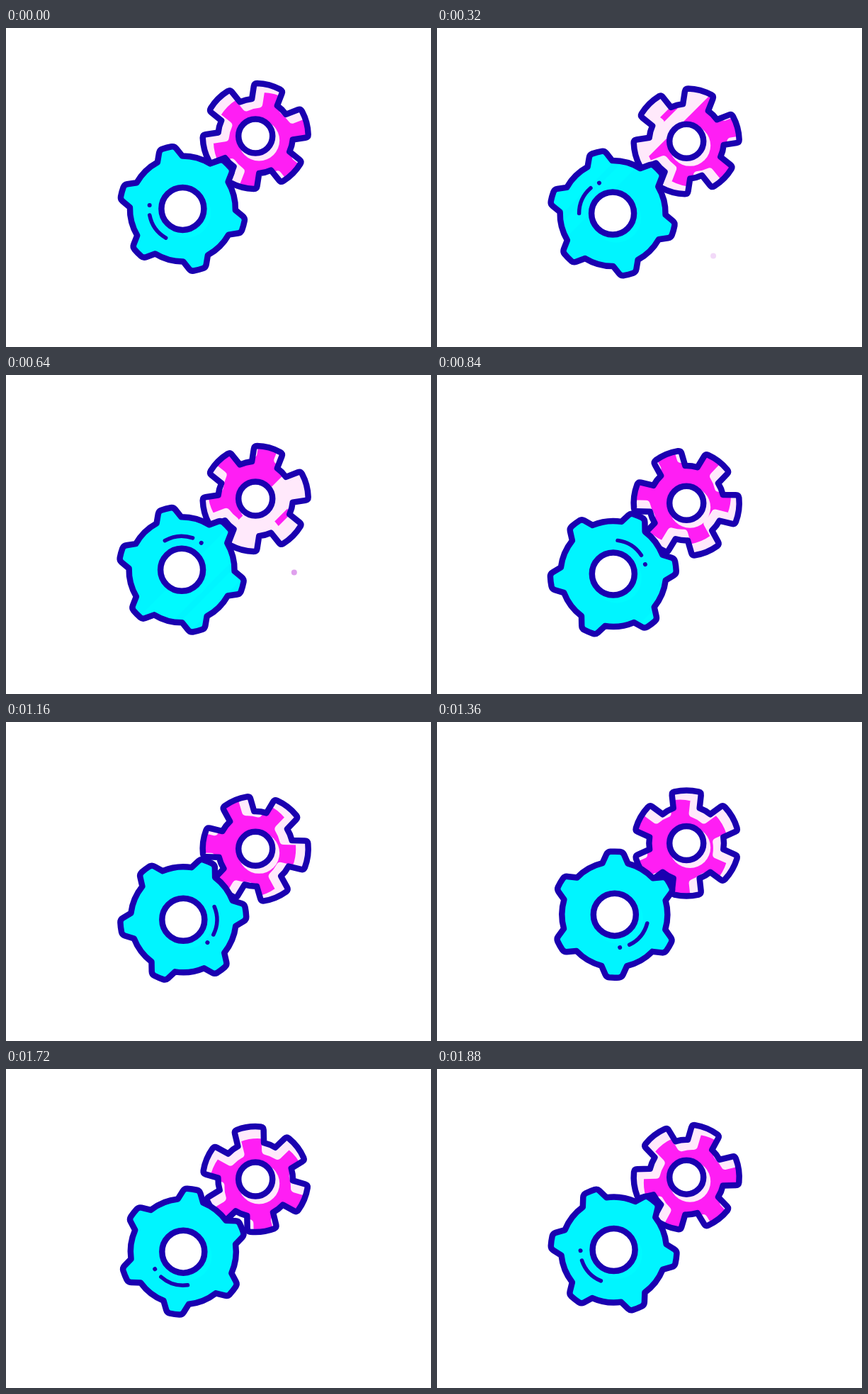
Write an HTML page with a canvas that moves like this. It is 600 px wide and 450 px high and loops after 1.92 s.

```html
<!DOCTYPE html>
<html lang="en">
<head>
<meta charset="utf-8">
<title>Gears</title>
<style>
  html, body { margin: 0; width: 100%; height: 100%; overflow: hidden; background: #fff; }
  canvas { display: block; }
</style>
</head>
<body>
<canvas id="stage" width="600" height="450"></canvas>
<script>
const ctx = document.getElementById('stage').getContext('2d');
const LOOP = 1920, STEP = 40, TEETH = 6, TAU = Math.PI * 2, RAD = Math.PI / 180;
const INK = '#1a00b0', LINE = 8.5, ROUND = 4;

const polar = (r, a) => [r * Math.cos(a), r * Math.sin(a)];

// Teeth between radius low and high; root and tip are half widths in degrees
function gearPath({ low, high, root, tip, start }) {
  const path = new Path2D(), pitch = TAU / TEETH, trim = ROUND / high;
  root *= RAD;
  tip *= RAD;
  for (let k = 0; k < TEETH; k++) {
    const mid = start * RAD + k * pitch;
    const side = dir => {
      const foot = polar(low, mid + dir * root), corner = polar(high, mid + dir * tip);
      const length = Math.hypot(corner[0] - foot[0], corner[1] - foot[1]);
      const near = corner.map((c, i) => c + (foot[i] - c) * ROUND / length);
      return { corner, near };
    };
    const a = side(-1), b = side(1);
    path.arc(0, 0, low, mid - pitch + root, mid - root);
    path.lineTo(...a.near);
    path.quadraticCurveTo(...a.corner, ...polar(high, mid - tip + trim));
    path.arc(0, 0, high, mid - tip + trim, mid + tip - trim);
    path.quadraticCurveTo(...b.corner, ...b.near);
  }
  path.closePath();
  return path;
}

const cyan = {
  path: gearPath({ low: 74.5, high: 89, root: 14, tip: 7, start: 15.5 }),
  hole: 30, main: '#00f5ff', light: '#00faff', shift: 4, inset: 1
};
const pink = {
  path: gearPath({ low: 52.8, high: 74.5, root: 20.5, tip: 16.3, start: -15 }),
  hole: 24, main: '#ff1ef4', light: '#ffe9fb', shift: 11.5, inset: 6
};

function circle(x, y, r) {
  ctx.beginPath();
  ctx.arc(x, y, r, 0, TAU);
}

function drawShine(edge) {
  ctx.save();
  ctx.rotate(Math.PI / 4);
  const band = (from, to) =>
    ctx.fillRect((edge + from) / Math.SQRT2, -150, (to - from) / Math.SQRT2, 300);
  band(-92, -39);
  band(-27, 0);
  ctx.restore();
}

function drawGear(gear, x, y, turn, edge) {
  ctx.save();
  ctx.translate(x, y);

  ctx.save();
  ctx.rotate(turn);
  ctx.clip(gear.path);
  ctx.fillStyle = gear.light;
  ctx.fill(gear.path);
  // Body colour, shifted inward so a light rim remains
  ctx.save();
  ctx.translate(...polar(gear.shift, 37 * RAD));
  ctx.fillStyle = gear.main;
  ctx.fill(gear.path);
  ctx.strokeStyle = gear.light;
  ctx.lineWidth = gear.inset * 2;
  ctx.stroke(gear.path);
  ctx.restore();
  // Light that does not turn with the gear
  ctx.rotate(-turn);
  ctx.fillStyle = gear.light;
  circle(5, 6, gear.hole + 5);
  ctx.fill();
  drawShine(edge);
  ctx.restore();

  ctx.strokeStyle = INK;
  ctx.lineWidth = LINE;
  ctx.save();
  ctx.rotate(turn);
  ctx.stroke(gear.path);
  ctx.restore();
  circle(0, 0, gear.hole);
  ctx.fillStyle = '#fff';
  ctx.fill();
  ctx.stroke();
  ctx.restore();
}

function drawGlint(x, y, turn) {
  ctx.save();
  ctx.translate(x, y);
  ctx.rotate(turn);
  ctx.lineWidth = 5.5;
  ctx.strokeStyle = ctx.fillStyle = INK;
  ctx.beginPath();
  ctx.arc(0, 0, 47.5, 120 * RAD, 169 * RAD);
  ctx.stroke();
  circle(...polar(47, 186 * RAD), 3);
  ctx.fill();
  ctx.restore();
}

// A dot that rises, slows down and fades
function drawSpark(t) {
  const u = (t - 280) / 440;
  if (u <= 0 || u >= 1) return;
  ctx.globalAlpha = Math.sin(Math.PI * u) ** 1.4;
  ctx.fillStyle = '#b41fd4';
  circle(388 + 23 * u, 334.5 - 151 * u + 101 * u * u, 4);
  ctx.fill();
  ctx.globalAlpha = 1;
}

function draw(t) {
  const turn = t / LOOP * TAU;
  const sway = Math.sin(turn), bob = -Math.cos(turn);
  const cx = 249.4 - 1.5 * sway, cy = 268.2 + 13.3 * bob;
  const u = (t - 320) / 160;
  const edge = -32 + 55 * u + 5 * u * u;

  ctx.fillStyle = '#fff';
  ctx.fillRect(0, 0, 600, 450);
  ctx.lineJoin = ctx.lineCap = 'round';
  drawGear(pink, 352.2, 167.2 + 14.7 * bob, -turn, edge);
  drawGear(cyan, cx, cy, turn, edge);
  drawGlint(cx, cy, turn);
  drawSpark(t);
}

const begin = performance.now();
function tick() {
  const t = (performance.now() - begin) % LOOP;
  draw(Math.floor(t / STEP) * STEP);
  requestAnimationFrame(tick);
}
tick();
</script>
</body>
</html>
```
